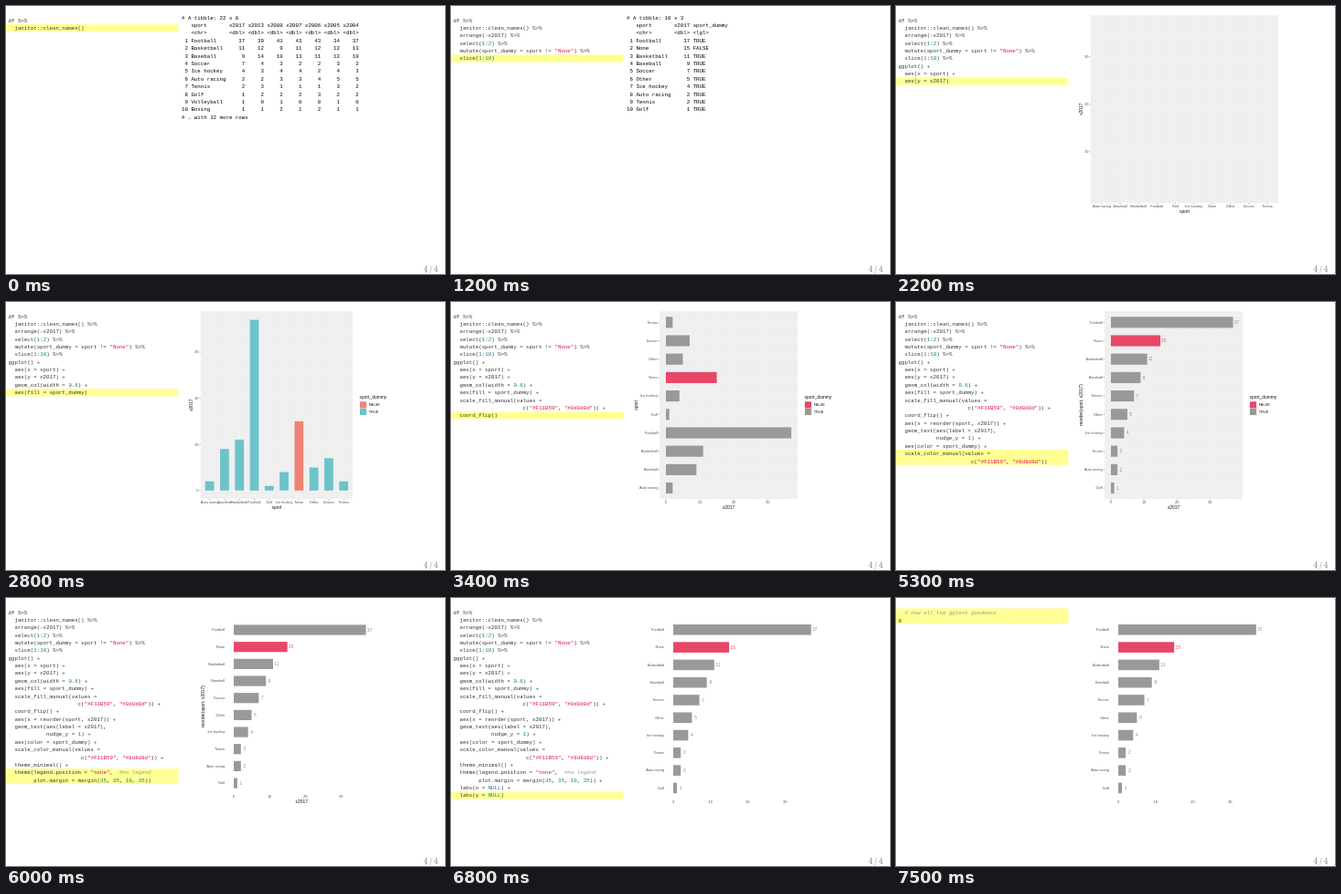
Write an HTML page with a canvas that moves like this. It is 480 px wide and 294 px high and loops after 8000 ms.

```html
<!DOCTYPE html>
<html lang="en">
<head>
<meta charset="utf-8">
<title>Code and plot, step by step</title>
<style>
  html, body { margin: 0; width: 100%; height: 100%; overflow: hidden; background: #fff; }
  canvas { display: block; width: 100vw; height: 100vh; }
</style>
</head>
<body>
<canvas id="stage"></canvas>
<script>
const W = 480, H = 294, LOOP = 8000;
const canvas = document.getElementById('stage');
const ctx = canvas.getContext('2d');

const MONO = '"Liberation Mono", "Courier New", monospace';
const SANS = '"Liberation Sans", Arial, sans-serif';
const SERIF = '"Noto Serif", serif';
const CODE_SIZE = 5.78, ADVANCE = 3.469, ROW = 8.37;

// ---------- data ----------
const YEARS = [2017, 2013, 2008, 2007, 2006, 2005, 2004];
const sports = `Football:37 39 41 43 43 34 37
Basketball:11 12 9 11 12 12 13
Baseball:9 14 10 13 11 12 10
Soccer:7 4 3 2 2 3 2
Ice hockey:4 3 4 4 2 4 3
Auto racing:2 2 3 3 4 5 5
Tennis:2 3 1 1 1 3 2
Golf:1 2 2 2 3 2 2
Volleyball:1 0 1 0 0 1 0
Boxing:1 1 2 1 2 1 1
None:15 8 11 10 12 11 12
Other:5 6 4 3 3 4 3`.split('\n').map(line => {
  const [name, nums] = line.split(':');
  return { name, nums: nums.split(' ').map(Number) };
});
const ranked = [...sports].sort((a, b) => b.nums[0] - a.nums[0]).slice(0, 10);
const alphabetic = [...ranked].sort((a, b) => a.name < b.name ? -1 : 1);
const ascending = [...ranked].reverse();
[ascending[1], ascending[2]] = [ascending[2], ascending[1]].sort((a, b) => a.name < b.name ? -1 : 1);

// ---------- steps ----------
const wide = { l: 199.6, r: 418, t: 10.2, b: 228, title: 202, lo: 0, hi: 37, order: alphabetic };
const withX = { ...wide, b: 216.2, cats: true, catTitle: 'sport' };
const withY = { ...withX, l: 212.9, vals: true, valTitle: 'x2017', lo: 1 };
const grey35 = { fill: ['#626262', '#626262'] };
const cols = { ...withY, lo: 0, bars: grey35 };
const filled = { ...cols, r: 379, legend: true, bars: { fill: ['#ee8378', '#6dc3c9'] } };
const manual = { ...filled, bars: { fill: ['#e84768', '#999999'] } };
const flipped = { ...manual, flip: true, l: 228.1 };
const sorted = { ...flipped, order: ascending, catTitle: 'reorder(sport, x2017)' };
const labelled = { ...sorted, hi: 38, label: ['#222', '#222'] };
const coloured = { ...labelled, label: ['#f08a80', '#6dc3c9'], keyText: true,
  bars: { fill: ['#e84768', '#999999'], line: ['#ee8378', '#74b9bd'] } };
const matched = { ...coloured, label: ['#ee4a72', '#8d8d8d'], bars: manual.bars };
const minimal = { ...matched, minimal: true };
const margins = { ...minimal, legend: false, l: 241.6, r: 404.9, t: 23.8, b: 214.3, title: 215 };
const noCat = { ...margins, l: 235.3, r: 405.6, catTitle: '' };
const noTitles = { ...noCat, t: 23.2, b: 220, valTitle: '' };

const table = (rows, head, years, dummy, foot) => ({ table: { rows, head, years, dummy, foot } });

const steps = [
  [0, 'df %>%\n  janitor::clean_names() %>%', table(sports.slice(0, 10), '22 x 8', 7, false, true)],
  [100, '  arrange(-x2017) %>%', table(ranked, '22 x 8', 7, false, true)],
  [600, '  select(1:2) %>%', table(ranked, '22 x 2', 1, false, true)],
  [800, '  mutate(sport_dummy = sport != "None") %>%', table(ranked, '22 x 3', 1, true, true)],
  [1200, '  slice(1:10) %>%', table(ranked, '10 x 3', 1, true, false)],
  [1500, 'ggplot() +', wide],
  [1700, '  aes(x = sport) +', withX],
  [2200, '  aes(y = x2017) +', withY],
  [2500, '  geom_col(width = 0.6) +', cols],
  [2800, '  aes(fill = sport_dummy) +', filled],
  [3100, '  scale_fill_manual(values =\n' + ' '.repeat(22) + 'c("#F11B59", "#8d8d8d")) +', manual],
  [3400, '  coord_flip() +', flipped],
  [3900, '  aes(x = reorder(sport, x2017)) +', sorted],
  [4200, '  geom_text(aes(label = x2017),\n' + ' '.repeat(12) + 'nudge_y = 1) +', labelled],
  [4700, '  aes(color = sport_dummy) +', coloured],
  [5200, '  scale_color_manual(values =\n' + ' '.repeat(23) + 'c("#F11B59", "#8d8d8d")) +', matched],
  [5600, '  theme_minimal() +', minimal],
  [6000, '  theme(legend.position = "none",  #no legend\n        plot.margin = margin(35, 35, 10, 35)) +', margins],
  [6400, '  labs(x = NULL) +', noCat],
  [6800, '  labs(y = NULL) ->', noTitles],
  [7100, 'g', null],
  [7500, '  # now all the ggtext goodness\ng', noTitles, true],
].map(([time, code, view, fresh]) => ({ time, lines: code.split('\n'), view, fresh }));
steps[0].lit = 1;

// ---------- drawing helpers ----------
function text(s, x, y, size, color, align = 'left', font = SANS, style = '') {
  ctx.font = `${style} ${size}px ${font}`;
  ctx.textAlign = align;
  ctx.fillStyle = color;
  ctx.fillText(s, x, y + size * 0.33);
}

function turned(s, x, y, size, color) {
  ctx.save();
  ctx.translate(x, y);
  ctx.rotate(-Math.PI / 2);
  text(s, 0, 0, size, color, 'center');
  ctx.restore();
}

function rect(x, y, w, h, color) {
  ctx.fillStyle = color;
  ctx.fillRect(x, y, w, h);
}

function line(x1, y1, x2, y2, color, width) {
  ctx.strokeStyle = color;
  ctx.lineWidth = width;
  ctx.beginPath();
  ctx.moveTo(x1, y1);
  ctx.lineTo(x2, y2);
  ctx.stroke();
}

// ---------- code pane ----------
const TOKEN = /("[^"]*")|(#.*$)|(\b\d[\d.]*\b|\bNULL\b)/g;

function codeLine(s, y) {
  const put = (part, at, color, style) =>
    text(part, 2.5 + at * ADVANCE, y, CODE_SIZE, color, 'left', MONO, style);
  let pos = 0;
  for (const m of s.matchAll(TOKEN)) {
    put(s.slice(pos, m.index), pos, '#333');
    const color = m[1] ? '#d14' : m[2] ? '#998' : '#008080';
    put(m[0], m.index, color, m[2] ? 'italic' : '');
    pos = m.index + m[0].length;
  }
  put(s.slice(pos), pos, '#333');
}

function drawCode(n) {
  let first = n;
  while (first > 0 && !steps[first].fresh) first--;
  const lines = steps.slice(first, n + 1).flatMap(s => s.lines);
  const last = lines.length - 1;
  lines[last] = lines[last].replace(/ (%>%|\+|->)$/, '');
  const lit = steps[n].lit || steps[n].lines.length;
  rect(0, 15.6 + (lines.length - lit - 0.5) * ROW, 188.5, lit * ROW, '#ffff96');
  lines.forEach((s, i) => codeLine(s, 15.6 + i * ROW));
}

// ---------- table ----------
function drawTable({ rows, head, years, dummy, foot }) {
  const row = (index, name, cells, extra) =>
    index.padStart(2) + ' ' + name.padEnd(11) + cells.map(c => ' ' + String(c).padStart(5)).join('') +
    (dummy ? ' ' + extra : '');
  const cells = YEARS.slice(0, years);
  const out = [
    '# A tibble: ' + head,
    row('', 'sport', cells.map(y => 'x' + y), 'sport_dummy'),
    row('', '<chr>', cells.map(() => '<dbl>'), '<lgl>'),
    ...rows.map((r, i) => row(String(i + 1), r.name, r.nums.slice(0, years),
      r.name === 'None' ? 'FALSE' : 'TRUE')),
  ];
  if (foot) out.push('# … with 12 more rows');
  out.forEach((s, i) => text(s, 192, 12.6 + i * 8.4, CODE_SIZE, '#000', 'left', MONO));
}

// ---------- plot ----------
function drawPlot(p) {
  const { l, r, t, b, flip } = p;
  const cat = i => flip ? b - (i + 0.6) * (b - t) / 10.2 : l + (i + 0.6) * (r - l) / 10.2;
  const val = v => {
    const f = ((v - p.lo) / (p.hi - p.lo) + 0.05) / 1.1;
    return flip ? l + f * (r - l) : b - f * (b - t);
  };
  const ticks = [0, 10, 20, 30].filter(v => v >= p.lo);
  const items = p.order.map((d, i) => ({ name: d.name, v: d.nums[0], at: cat(i), hue: d.name === 'None' ? 0 : 1 }));

  if (!p.minimal) {
    rect(l, t, r - l, b - t, '#efefef');
    const grid = (at, upright, w) => upright
      ? line(at, t, at, b, 'rgba(255,255,255,.45)', w)
      : line(l, at, r, at, 'rgba(255,255,255,.45)', w);
    if (p.cats) items.forEach(d => grid(d.at, !flip, 0.6));
    if (p.vals) {
      ticks.forEach(v => grid(val(v), flip, 0.6));
      [5, 15, 25, 35].forEach(v => grid(val(v), flip, 0.3));
    }
  }

  const axis = (at, label, below) => {
    if (below) {
      if (!p.minimal) line(at, b, at, b + 1.4, '#555', 0.45);
      text(label, at, b + 3.6, 3.92, '#4d4d4d', 'center');
    } else {
      if (!p.minimal) line(l - 1.4, at, l, at, '#555', 0.45);
      text(label, l - 2.4, at, 3.92, '#4d4d4d', 'right');
    }
  };
  if (p.cats) items.forEach(d => axis(d.at, d.name, !flip));
  if (p.vals) ticks.forEach(v => axis(val(v), v, flip));

  const below = flip ? p.valTitle : p.catTitle;
  const beside = flip ? p.catTitle : p.valTitle;
  if (below) text(below, (l + r) / 2, b + 9.1, 4.9, '#111', 'center');
  if (beside) turned(beside, p.title, (t + b) / 2, 4.9, '#111');

  if (p.bars) {
    const half = 0.3 * (flip ? b - t : r - l) / 10.2;
    for (const d of items) {
      const box = flip
        ? [val(0), d.at - half, val(d.v) - val(0), half * 2]
        : [d.at - half, val(d.v), half * 2, val(0) - val(d.v)];
      rect(...box, p.bars.fill[d.hue]);
      if (p.bars.line) {
        ctx.strokeStyle = p.bars.line[d.hue];
        ctx.lineWidth = 0.8;
        ctx.strokeRect(...box);
      }
    }
  }
  if (p.label) items.forEach(d => text(d.v, val(d.v + 1), d.at, 4.9, p.label[d.hue], 'center'));
  if (p.legend) drawLegend(p);
}

function drawLegend(p) {
  text('sport_dummy', 386.6, 104.3, 4.9, '#111');
  ['FALSE', 'TRUE'].forEach((name, i) => {
    const y = 109.3 + i * 7.6;
    rect(386.9, y, 7.2, 7.2, p.bars.fill[i]);
    if (p.bars.line) {
      ctx.strokeStyle = p.bars.line[i];
      ctx.lineWidth = 0.8;
      ctx.strokeRect(387.2, y + 0.3, 6.6, 6.6);
    }
    if (p.keyText) text('a', 390.5, y + 3.6, 4.9, p.label[i], 'center');
    text(name, 396.7, y + 3.8, 3.92, '#111');
  });
}

// ---------- loop ----------
function draw(ms) {
  const n = steps.findLastIndex(s => s.time <= ms);
  const { view } = steps[n];
  rect(0, 0, W, H, '#fff');
  drawCode(n);
  if (view) view.table ? drawTable(view.table) : drawPlot(view);
  text('4 / 4', 472.3, 289.2, 8.2, '#8f8f8f', 'right', SERIF);
}

function resize() {
  const ratio = window.devicePixelRatio || 1;
  canvas.width = Math.round(innerWidth * ratio);
  canvas.height = Math.round(innerHeight * ratio);
}

const start = performance.now();
function tick() {
  ctx.setTransform(canvas.width / W, 0, 0, canvas.height / H, 0, 0);
  draw((performance.now() - start) % LOOP);
  requestAnimationFrame(tick);
}

addEventListener('resize', resize);
resize();
tick();
</script>
</body>
</html>
```
